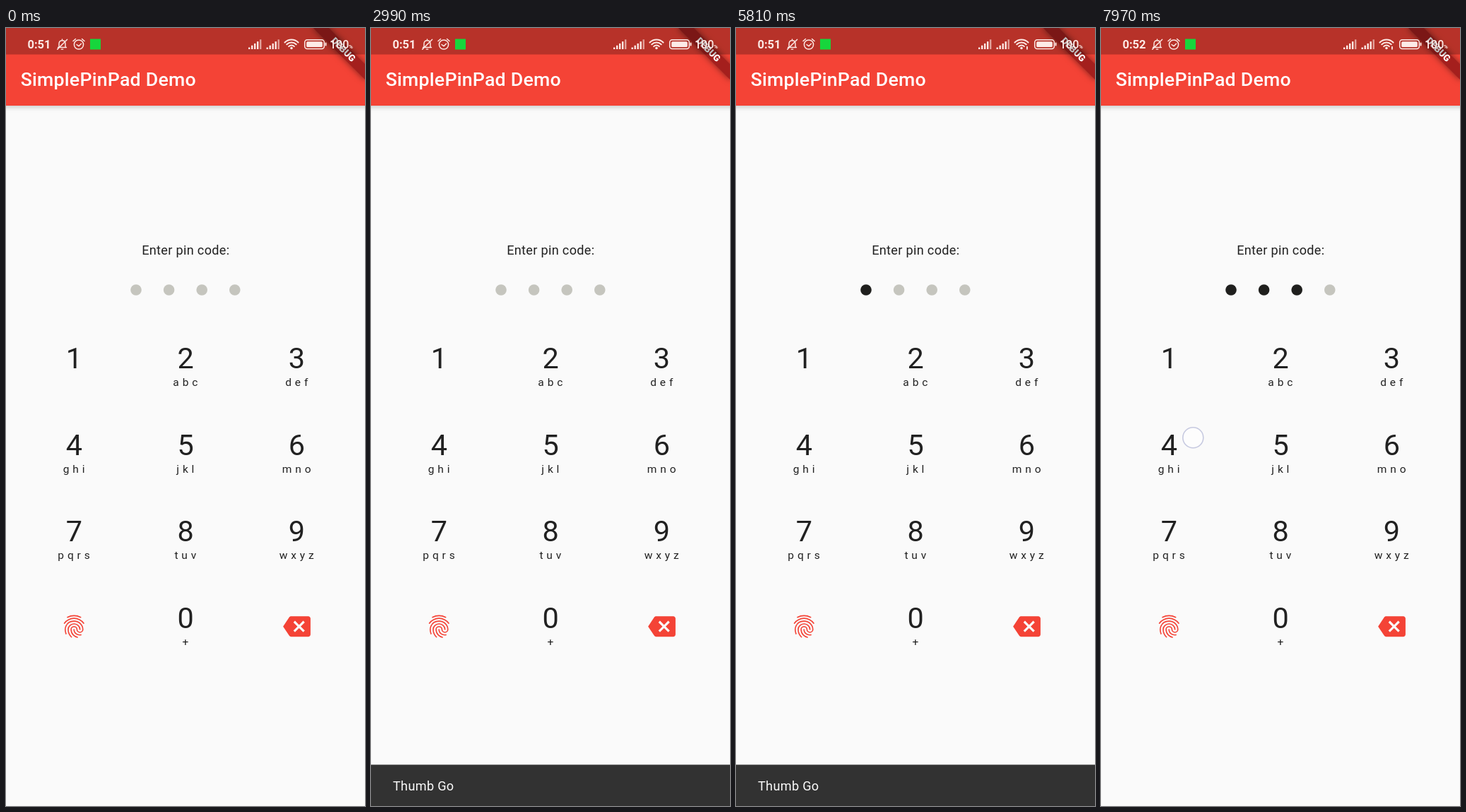
An HTML page with a canvas for the animation above (8 s loop, 508 px wide and 1102 px high).

```html
<!DOCTYPE html>
<html lang="en">
<head>
<meta charset="utf-8">
<title>Pin pad demo</title>
<style>
html, body { margin: 0; width: 100%; height: 100%; overflow: hidden; background: #fafafa; }
canvas { display: block; width: 508px; height: 1102px; }
</style>
</head>
<body>
<canvas id="stage"></canvas>
<script>
const W = 508, H = 1102, LOOP = 8000;
const RED = '#f44336', INK = 'rgba(0,0,0,.87)', PALE = '#fdeae6';
const canvas = document.getElementById('stage');
const ctx = canvas.getContext('2d');
const dpr = window.devicePixelRatio || 1;
canvas.width = W * dpr;
canvas.height = H * dpr;

const COLS = [96.3, 254.1, 411.5];
const ROW_TOP = 479.6, ROW_STEP = 122.7;
const KEYS = [
  ['1', ''], ['2', 'a b c'], ['3', 'd e f'],
  ['4', 'g h i'], ['5', 'j k l'], ['6', 'm n o'],
  ['7', 'p q r s'], ['8', 't u v'], ['9', 'w x y z'],
  null, ['0', '+'], null
];
// Press time, key index, touch offset from the key centre
const TAPS = [
  { at: 2290, key: 9, dx: 2, dy: -14 },
  { at: 5350, key: 0, dx: 20, dy: -14 },
  { at: 6130, key: 1, dx: 14, dy: -14 },
  { at: 7050, key: 2, dx: 10, dy: -14 },
  { at: 7930, key: 3, dx: 34, dy: -22 }
];
const HOLD = 125;
const SNACK_IN = 2425, SNACK_OUT = 6690, SNACK_MS = 250, SNACK_H = 58.5;
const MINUTE_AT = 7300;

const FINGERPRINT = new Path2D(
  'M17.81 3.97C15.9 3 14.2 2.5 12 2.5C9.9 2.5 8 3 6.2 3.97' +
  'M3.5 9.22C4.4 7.9 5.6 6.8 7.07 6.1C10.1 4.53 13.9 4.53 16.92 6.1C18.3 6.8 19.5 7.8 20.49 9.19' +
  'M9.75 21.29C8.9 20.5 8.5 20 7.82 18.7C7.2 17.5 6.84 16.1 6.84 14.61C6.84 11.9 9.15 9.72 12 9.72S17.16 11.9 17.16 14.61' +
  'M11.94 14.66C11.94 16.2 12.75 17.75 14.1 18.63C14.9 19.2 15.8 19.44 16.92 19.44C17.3 19.44 17.7 19.4 18.05 19.33' +
  'M14.91 21.5C13.4 21.08 12.45 20.55 11.41 19.53C10.1 18.2 9.39 16.5 9.39 14.66C9.39 13.3 10.55 12.22 11.97 12.22' +
  'S14.55 13.3 14.55 14.66C14.55 16 15.7 17.1 17.13 17.1S19.71 16 19.71 14.66C19.71 10.6 16.25 7.33 11.97 7.33' +
  'C8.95 7.33 6.2 9 4.92 11.6C4.5 12.5 4.27 13.5 4.27 14.66C4.27 15.5 4.35 16.8 4.98 18.44');
const BACKSPACE = new Path2D(
  'M22 3H7c-.69 0-1.23.35-1.59.88L0 12l5.41 8.11c.36.53.9.89 1.59.89h15c1.1 0 2-.9 2-2V5c0-1.1-.9-2-2-2z' +
  'm-3 12.59L17.59 17 14 13.41 10.41 17 9 15.59 12.59 12 9 8.41 10.41 7 14 10.59 17.59 7 19 8.41 15.41 12z');
const BELL = new Path2D(
  'M6 17.5V11C6 7 8.5 5 12 5S18 7 18 11V17.5M4 18H20M10.5 21.5H13.5M12 2.5V5M3 21.5L21.5 3');

const clamp = x => Math.min(1, Math.max(0, x));
const keyCentre = i => [COLS[i % 3], ROW_TOP + ROW_STEP * Math.floor(i / 3)];

// cubic-bezier(.4, 0, .2, 1)
function ease(x) {
  if (x <= 0 || x >= 1) return clamp(x);
  let lo = 0, hi = 1, s = .5;
  for (let i = 0; i < 24; i++) {
    s = (lo + hi) / 2;
    const bx = 1.2 * s * (1 - s) ** 2 + .6 * s * s * (1 - s) + s ** 3;
    if (bx < x) lo = s; else hi = s;
  }
  return 3 * s * s * (1 - s) + s ** 3;
}

function text(str, x, y, size, { weight = 400, color = INK, align = 'center', gap = 0 } = {}) {
  ctx.font = `${weight} ${size}px Roboto, sans-serif`;
  ctx.letterSpacing = gap + 'px';
  ctx.textAlign = align;
  ctx.fillStyle = color;
  ctx.fillText(str, x, y);
}

function disc(x, y, r, color) {
  ctx.beginPath();
  ctx.arc(x, y, r, 0, Math.PI * 2);
  ctx.fillStyle = color;
  ctx.fill();
}

function icon(cx, cy, size, paint) {
  ctx.save();
  ctx.translate(cx - size / 2, cy - size / 2);
  ctx.scale(size / 24, size / 24);
  paint();
  ctx.restore();
}

function appBar() {
  ctx.save();
  ctx.shadowColor = 'rgba(0,0,0,.22)';
  ctx.shadowBlur = 7 * dpr;
  ctx.shadowOffsetY = 2 * dpr;
  ctx.fillStyle = RED;
  ctx.fillRect(-20, -20, W + 40, 130);
  ctx.restore();
  text('SimplePinPad Demo', 20.7, 82, 26.7, { weight: 500, color: '#fff', align: 'left', gap: .22 });
}

function banner() {
  const off = 51.7, h = 15.5;
  ctx.save();
  ctx.translate(W, 0);
  ctx.rotate(Math.PI / 4);
  ctx.save();
  ctx.shadowColor = 'rgba(0,0,0,.5)';
  ctx.shadowBlur = 10 * dpr;
  ctx.fillStyle = '#a41f1d';
  ctx.fillRect(-off, off - h, off * 2, h);
  ctx.restore();
  text('DEBUG', 0, off - 4, 13.2, { weight: 900, color: '#fff' });
  ctx.restore();
}

function signal(x) {
  for (let i = 0; i < 5; i++) {
    const h = 2.5 + i * 2.8;
    ctx.globalAlpha = i === 4 ? .6 : 1;
    ctx.fillRect(x + i * 4, 30 - h, 2.4, h);
  }
  ctx.globalAlpha = 1;
}

function wifi(x, y) {
  ctx.lineWidth = 2;
  for (const r of [5.5, 9.5, 13.5]) {
    ctx.beginPath();
    ctx.arc(x, y, r, -Math.PI * .75, -Math.PI * .25);
    ctx.stroke();
  }
  disc(x, y - 1.5, 1.8, PALE);
}

function alarm(x, y) {
  ctx.lineWidth = 1.5;
  ctx.beginPath();
  ctx.arc(x, y, 6.6, 0, Math.PI * 2);
  ctx.moveTo(x - 3, y);
  ctx.lineTo(x, y + 2.2);
  ctx.lineTo(x + 3.4, y - 1.2);
  for (const s of [-1, 1]) {
    ctx.moveTo(x + s * 4.5, y - 8);
    ctx.lineTo(x + s * 8, y - 5);
  }
  ctx.stroke();
}

function statusBar(t) {
  ctx.fillStyle = 'rgba(0,0,0,.25)';
  ctx.fillRect(0, 0, W, 37.5);
  const style = { weight: 600, color: PALE, align: 'left' };
  text(t < MINUTE_AT ? '0:51' : '0:52', 30.5, 29, 16.5, style);
  ctx.strokeStyle = PALE;
  ctx.lineCap = ctx.lineJoin = 'round';
  icon(79.5, 23, 18, () => {
    ctx.lineWidth = 1.9;
    ctx.stroke(BELL);
  });
  alarm(103, 23.5);
  ctx.fillStyle = '#16d63c';
  ctx.fillRect(119, 15.5, 15, 15);

  ctx.fillStyle = PALE;
  signal(343);
  signal(368.5);
  wifi(404, 30);
  if (t > 4500) ctx.fillRect(411, 26, 1.8, 4.5);
  ctx.lineWidth = 1.5;
  ctx.beginPath();
  ctx.roundRect(422.7, 16.7, 27.6, 12.8, 3.5);
  ctx.stroke();
  ctx.beginPath();
  ctx.roundRect(425.2, 19.2, 22.6, 7.8, 1.5);
  ctx.roundRect(451.5, 20.5, 2, 5, 1);
  ctx.fill();
  text('100', 458, 29, 16, { ...style, weight: 500 });
  text('%', 485, 29, 8, style);
}

function ripple(tap, t) {
  const age = t - tap.at;
  const a = .1 * clamp((age - 40) / 80) * clamp(1 - (age - HOLD) / 200);
  if (a > 0) disc(...keyCentre(tap.key), 90.5, `rgba(0,0,0,${a})`);
}

function touch(tap, t) {
  const age = t - tap.at;
  if (age < 0 || age > HOLD + 90) return;
  const [x, y] = keyCentre(tap.key);
  disc(x + tap.dx, y + tap.dy, 14.5, 'rgba(255,255,255,.55)');
  ctx.strokeStyle = 'rgba(180,184,215,.75)';
  ctx.lineWidth = 1.6;
  ctx.stroke();
}

function pad(t) {
  text('Enter pin code:', 254.3, 320.5, 18.1, { gap: .32 });
  const typed = TAPS.filter(p => p.key !== 9 && t >= p.at + HOLD).length;
  for (let i = 0; i < 4; i++) disc(184 + i * 46.6, 371, 7.8, i < typed ? '#1f1f1d' : '#c5c5be');

  KEYS.forEach((key, i) => {
    if (!key) return;
    const [x, y] = keyCentre(i);
    text(key[0], x, y + 2.4, 41.4);
    text(key[1], x, y + 27.4, 15.5, { gap: .52 });
  });
  icon(...keyCentre(9), 38.8, () => {
    ctx.strokeStyle = RED;
    ctx.lineWidth = 1;
    ctx.lineCap = 'round';
    ctx.stroke(FINGERPRINT);
  });
  icon(...keyCentre(11), 38.8, () => {
    ctx.fillStyle = RED;
    ctx.fill(BACKSPACE, 'evenodd');
  });
}

function snackBar(t) {
  const p = t < SNACK_OUT ? clamp((t - SNACK_IN) / SNACK_MS) : clamp(1 - (t - SNACK_OUT) / SNACK_MS);
  if (!p) return;
  const top = H - SNACK_H * ease(p);
  ctx.fillStyle = '#323232';
  ctx.fillRect(0, top, W, H - top);
  ctx.globalAlpha = ease((p - .72) / .28);
  text('Thumb Go', 31, top + 36.5, 18.1, { color: '#fafafa', align: 'left', gap: .32 });
  ctx.globalAlpha = 1;
}

function draw(t) {
  ctx.setTransform(dpr, 0, 0, dpr, 0, 0);
  ctx.fillStyle = '#fafafa';
  ctx.fillRect(0, 0, W, H);
  TAPS.forEach(tap => ripple(tap, t));
  pad(t);
  snackBar(t);
  appBar();
  banner();
  statusBar(t);
  TAPS.forEach(tap => touch(tap, t));
}

function tick() {
  draw(performance.now() % LOOP);
  requestAnimationFrame(tick);
}
tick();
</script>
</body>
</html>
```
